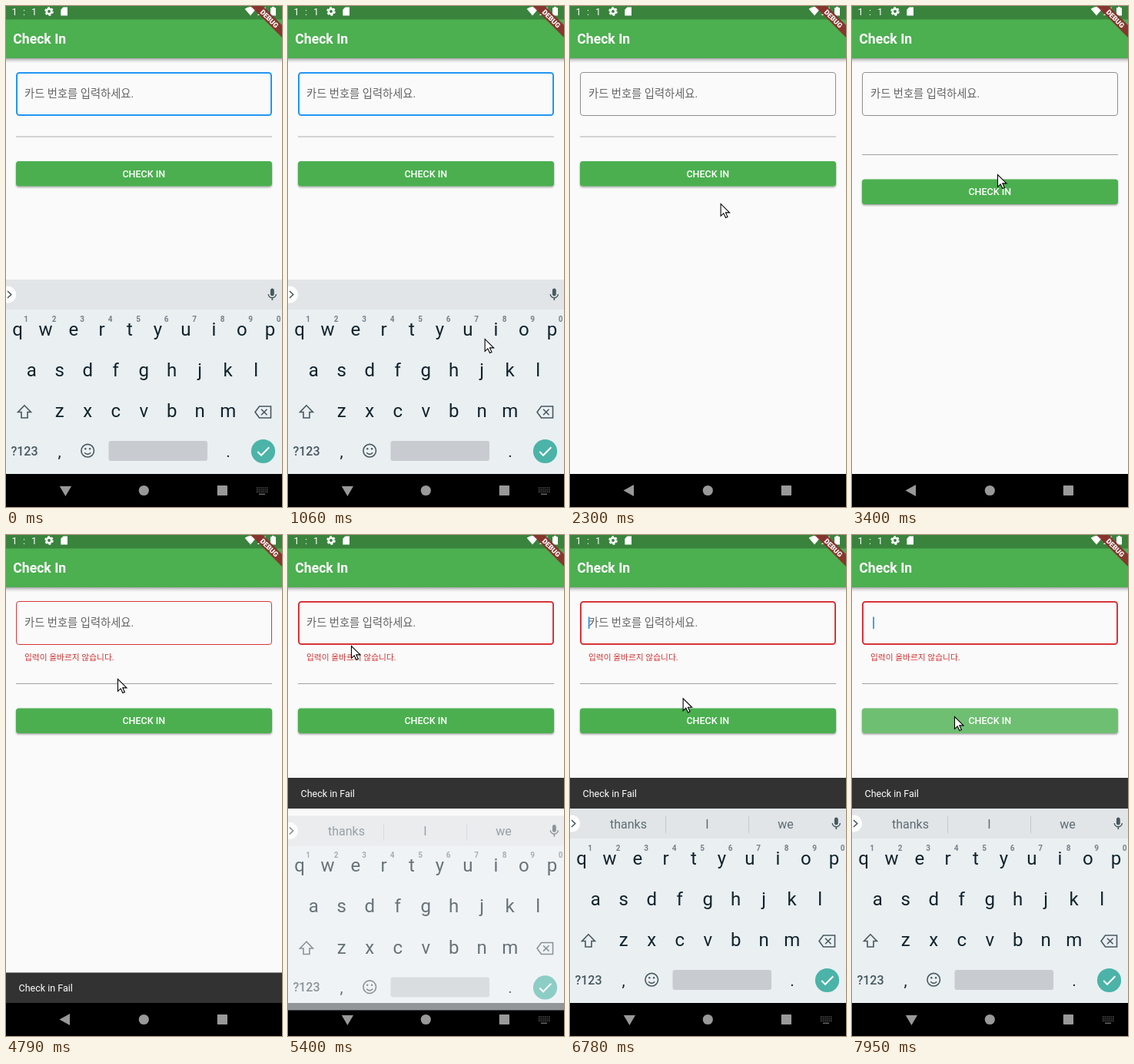
Write an HTML page that moves like this. It is 359 px wide and 652 px high and loops after 8000 ms.

```html
<!DOCTYPE html>
<html lang="ko">
<head>
<meta charset="utf-8">
<title>Check In</title>
<style>
  html, body { margin: 0; width: 100%; height: 100%; overflow: hidden; background: #fafafa; }
  svg { display: block; width: 100%; height: 100%; }
  text { font-family: Roboto, "Noto Sans CJK KR", "Noto Sans CJK", sans-serif; white-space: pre; }
  .mid { text-anchor: middle; }
  .medium { font-weight: 500; }
  .key { font-size: 24px; fill: #10232c; }
  .num { font-size: 10px; font-weight: 700; fill: #75838a; }
  .word { font-size: 16px; fill: #5d6c74; }
  .line { fill: none; stroke: #46585f; stroke-width: 1.6; }
</style>
</head>
<body>
<svg viewBox="0 0 359 652" preserveAspectRatio="none">
  <defs>
    <linearGradient id="shade" x2="0" y2="1">
      <stop stop-color="#000" stop-opacity=".34"/>
      <stop offset=".45" stop-color="#000" stop-opacity=".13"/>
      <stop offset="1" stop-color="#000" stop-opacity="0"/>
    </linearGradient>
    <filter id="lift" x="-5%" y="-20%" width="110%" height="150%">
      <feDropShadow dx="0" dy="1.4" stdDeviation="1.1" flood-opacity=".38"/>
    </filter>
    <clipPath id="buttonClip"><rect x="13" y="202" width="333" height="32.5" rx="3.5"/></clipPath>
  </defs>

  <rect width="359" height="652" fill="#fafafa"/>
  <rect y="68" width="359" height="6" fill="url(#shade)"/>
  <rect width="359" height="68" fill="#4caf50"/>
  <rect width="359" height="17.5" fill="#39833c"/>
  <text x="9.3" y="49" font-size="17.6" font-weight="700" fill="#fff">Check In</text>

  <rect id="box" rx="3.5" fill="none"/>
  <text id="hint" x="24" y="119" font-size="14.29" fill="#646464">카드 번호를 입력하세요.</text>
  <rect id="caret" y="106.5" width="1.7" height="15.5" fill="#2f8fe6"/>
  <text id="error" x="24" y="162.8" font-size="10.72" fill="#d32f2f">입력이 올바르지 않습니다.</text>
  <rect id="rule" x="13" width="333"/>

  <g id="button">
    <rect x="13" y="202" width="333" height="32.5" rx="3.5" fill="#4caf50" filter="url(#lift)"/>
    <g clip-path="url(#buttonClip)"><circle id="splash" fill="#fff" fill-opacity=".2"/></g>
    <text x="179.3" y="222.8" font-size="12.5" class="mid medium" fill="#fff">CHECK IN</text>
  </g>

  <g id="snack">
    <rect y="569.5" width="359" height="40" fill="#323232"/>
    <text x="16.6" y="594" font-size="12.5" fill="#fff">Check in Fail</text>
  </g>

  <g fill="#fff">
    <g font-size="12.5"><text x="7.6" y="12">1</text><text x="22" y="12">:</text><text x="33" y="12">1</text></g>
    <circle cx="56" cy="7" r="3.2" fill="none" stroke="#fff" stroke-width="2.5"/>
    <circle cx="56" cy="7" r="4.9" fill="none" stroke="#fff" stroke-width="1.8" stroke-dasharray="2.9 2.23"/>
    <path d="M74.5 1.5H80V12.5H71.3V4.7Z"/>
    <path d="M310.6 3.8Q318 -1.8 325.4 3.8L318 12.5Z"/>
    <path d="M337.5 1V12H326.8Z"/>
    <path d="M344 2.2H346V1H349V2.2H351V12.5H344Z"/>
  </g>
  <path d="M318 0H334L359 25V41Z" fill="#8b302c" fill-opacity=".94"/>
  <text transform="translate(342.5 16.5) rotate(45)" y="3.2" font-size="9.1" font-weight="900" class="mid" fill="#fff">DEBUG</text>

  <rect y="609" width="359" height="43" fill="#000"/>
  <g fill="#999">
    <path id="back" d="M69.5 630.5L83 623V638Z"/>
    <path id="down" d="M69.8 625H85L77.4 638Z"/>
    <circle cx="179.3" cy="630.5" r="6.6"/>
    <rect x="274.8" y="624" width="13.2" height="13" rx=".8"/>
    <g id="switcher" fill="#777"></g>
  </g>

  <g id="keyboard">
    <rect y="356" width="359" height="253" fill="#eaeff2"/>
    <rect y="356" width="359" height="39" fill="#e1e5e7"/>
    <circle cx="2" cy="375.5" r="11" fill="#fff"/>
    <path d="M2 371L6.7 375.5L2 380" class="line" stroke-width="1.9"/>
    <path transform="translate(336.6 366) scale(.81)" fill="#46585f" d="M12 14c1.66 0 3-1.34 3-3V5c0-1.66-1.34-3-3-3S9 3.34 9 5v6c0 1.66 1.34 3 3 3zm5.3-3c0 3-2.54 5.1-5.3 5.1S6.7 14 6.7 11H5c0 3.41 2.72 6.23 6 6.72V21h2v-3.28c3.28-.48 6-3.3 6-6.72z"/>
    <g id="words" class="mid word">
      <text x="76" y="382">thanks</text><text x="178.5" y="382">I</text><text x="280.5" y="382">we</text>
      <path d="M124.5 366V388M232.5 366V388" stroke="#c3c9cc"/>
    </g>
    <g id="keys" class="mid"></g>
    <path d="M24 519.8L15.6 528.5H20V536H28V528.5H32.4Z" class="line"/>
    <path d="M329.5 521H344.5V536H329.5L324 528.5ZM332 524.8L339.5 532.2M339.5 524.8L332 532.2" class="line"/>
    <text x="24" y="585" font-size="16" class="mid medium" fill="#46585f">?123</text>
    <text x="69.5" y="587" class="mid" font-size="21" fill="#10232c">,</text>
    <text x="289" y="587" class="mid" font-size="21" fill="#10232c">.</text>
    <circle cx="106.2" cy="578.7" r="8.3" class="line"/>
    <path d="M102.2 581.2Q106.2 585.6 110.2 581.2" class="line"/>
    <circle cx="103.3" cy="576.3" r="1.2" fill="#46585f"/><circle cx="109.1" cy="576.3" r="1.2" fill="#46585f"/>
    <rect x="133.5" y="566" width="128.5" height="26" rx="3" fill="#c8ccd0"/>
    <circle cx="334.5" cy="579.5" r="15.6" fill="#4bb3a8"/>
    <path d="M327.3 580L332 584.8L342.3 574.3" fill="none" stroke="#fff" stroke-width="2"/>
  </g>

  <path id="mouse" d="M.5 .5V16.3L4.2 12.9L6.9 18.6L9.4 17.4L6.8 11.9H12Z" fill="#fff" stroke="#000" stroke-width="1.1"/>
</svg>

<script>
const LOOP = 8000, TICK = 70;
const ENTER = 730, BLUR = 1480, PRESS = 3070, CHECK = 3400, FAIL = 3940,
      FOCUS = 5270, TYPE = 7460, PRESS_AGAIN = 7800;

const el = id => document.getElementById(id);
const set = (id, attrs) => { for (const k in attrs) el(id).setAttribute(k, attrs[k]); };
const show = (id, on) => { el(id).style.display = on ? "" : "none"; };
const ramp = (t, from, length) => Math.min(1, Math.max(0, (t - from) / length));
const mix = (a, b, p) => a + (b - a) * p;

// Keyboard letters and the small grid icon
const PITCH = 36.5;
["qwertyuiop", "asdfghjkl", "zxcvbnm"].forEach((row, r) => {
  const left = 179.2 - (row.length - 1) * PITCH / 2;
  [...row].forEach((c, i) => {
    const x = left + i * PITCH;
    el("keys").innerHTML += `<text class="key" x="${x}" y="${428.9 + r * 53.1}">${c}</text>` +
      (r ? "" : `<text class="num" x="${x + 11.2}" y="410.8">${(i + 1) % 10}</text>`);
  });
});

let dots = '<rect x="329" y="634.6" width="8" height="1.3"/>';
for (let i = 0; i < 18; i++)
  dots += `<rect x="${326 + i % 6 * 2.6}" y="${626.5 + Math.floor(i / 6) * 2.6}" width="1.3" height="1.3"/>`;
el("switcher").innerHTML = dots;

// Pointer moves: start, end, x, y
const moves = [
  [ENTER, 1340, 201, 288], [1760, 2850, 189, 219], [4720, 4860, 101, 155],
  [4930, 5120, 83, 121], [5120, 5400, 82, 144], [5680, 6020, 113, 166],
  [6220, 6500, 153, 185], [6570, 7130, 136, 258], [7270, 7620, 133, 236]
];

function pointer(t) {
  let x = 302, y = 556;
  for (const [from, to, x2, y2] of moves) {
    if (t < from) break;
    const p = t >= to ? 1 : Math.floor((t - from) / TICK) * TICK / (to - from);
    x = mix(x, x2, p);
    y = mix(y, y2, p);
  }
  return [x, y];
}

function splashSize(t) {
  if (t >= PRESS_AGAIN) return (t - PRESS_AGAIN) * 2.4;
  return t >= PRESS && t < CHECK ? mix(9, 15, ramp(t, PRESS, TICK)) : 0;
}

function draw(t) {
  const moved = t >= CHECK, failed = t >= FAIL, typed = t >= TYPE;
  const open = t < BLUR || t >= FOCUS;

  // Field
  const focus = t < FAIL ? 1 - ramp(t, BLUR, 170) : ramp(t, FOCUS, 130);
  const w = 1 + focus;
  const blue = [142, 142, 142].map((v, i) => mix(v, [33, 150, 243][i], focus));
  set("box", {
    x: 13 + w / 2, y: 86 + w / 2, width: 333 - w, height: 57 - w,
    stroke: failed ? "#d83438" : `rgb(${blue})`, "stroke-width": w
  });
  const lit = open && t >= 460 && (t - 460) % 1000 < 500;
  set("caret", { x: typed ? 27.2 : 23.8, opacity: lit ? ramp(t, 5300, 300) || 1 : 0 });
  show("hint", !typed);
  show("error", failed);

  // Divider, button and message bar
  set("rule", moved
    ? { y: 193, height: 1, fill: "#a0a0a0" }
    : { y: 169.2, height: 1.9, fill: "#d0d0d0" });
  const shift = moved ? 23.6 : 0;
  set("button", { transform: `translate(0 ${shift})` });
  show("snack", failed);
  set("snack", { transform: `translate(0 ${t >= FOCUS ? -253.5 : 0})` });

  // Keyboard slides and fades
  const away = t < FOCUS ? ramp(t, BLUR, 310) ** 2 : (1 - ramp(t, FOCUS, 340)) ** 2;
  set("keyboard", { transform: `translate(0 ${25 * away})`, opacity: 1 - away });
  show("words", failed);
  show("down", open);
  show("switcher", open);
  show("back", !open);

  const [x, y] = pointer(t);
  show("mouse", t >= ENTER);
  set("mouse", { transform: `translate(${x} ${y})` });
  set("splash", { cx: x, cy: y - shift, r: splashSize(t) });
}

const start = performance.now();
function frame(now) {
  draw(Math.max(0, now - start) % LOOP);
  requestAnimationFrame(frame);
}
draw(0);
requestAnimationFrame(frame);
</script>
</body>
</html>
```
